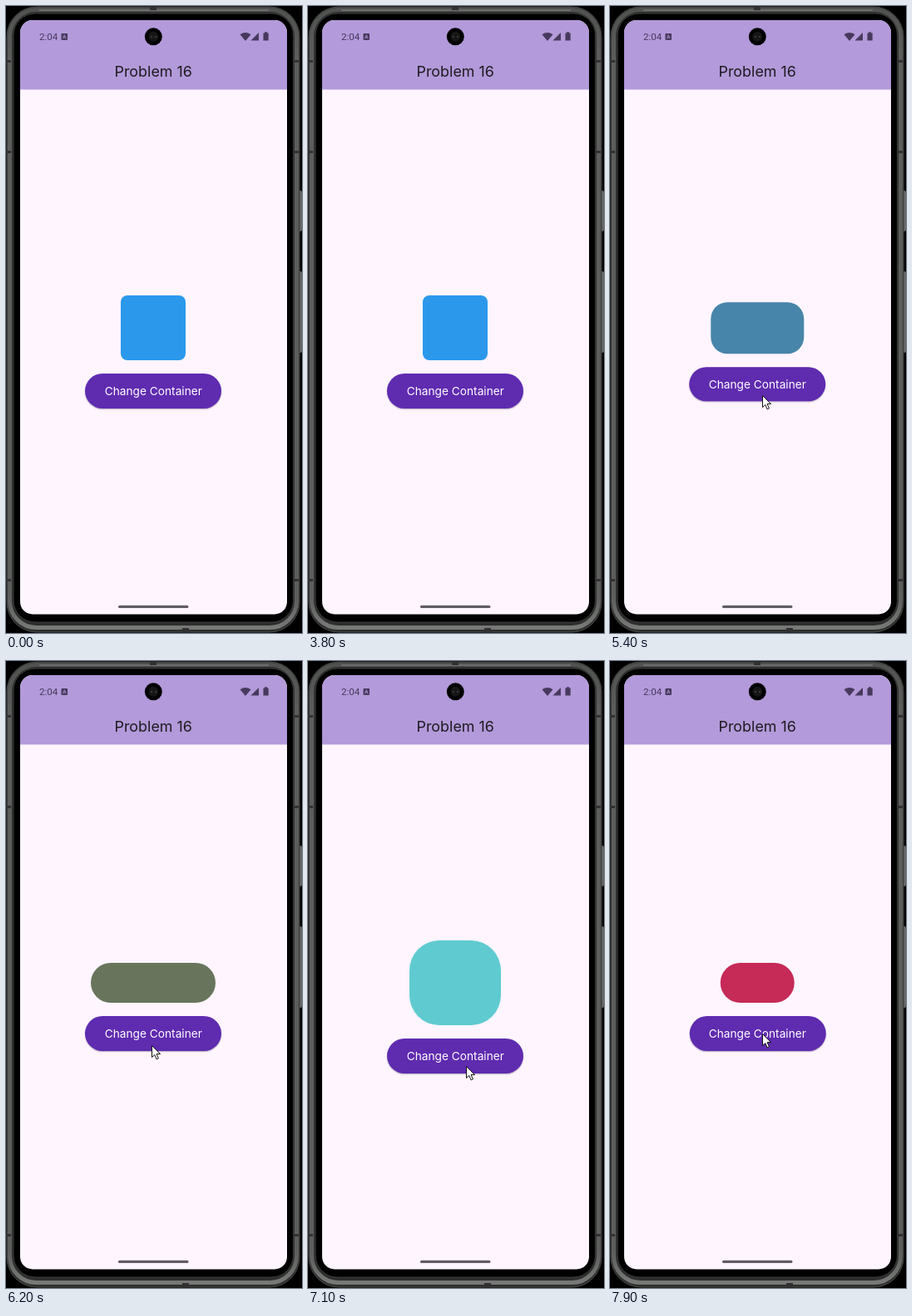
Recreate the animation shown at these times as an HTML page. Size 356x754 px, loop 8000 ms.

```html
<!DOCTYPE html>
<html lang="en">
<head>
<meta charset="utf-8">
<title>Change Container</title>
<style>
  html, body { margin: 0; width: 100%; height: 100%; overflow: hidden; background: #000; }
  .stage { position: relative; width: 356px; height: 754px; overflow: hidden; }
  .stage > svg { position: absolute; left: 0; top: 0; }

  /* The small negative delay keeps stepped poses clear of the 100 ms boundaries. */
  .box, .cursor { animation: 8s -10ms infinite; }

  .box {
    position: absolute; left: 177.3px; top: 387.4px;
    transform: translate(-50%, -50%);
    animation-name: morph; animation-timing-function: step-end;
  }
  .button {
    position: absolute; left: 50%; top: calc(100% + 16px);
    width: 164px; height: 41.5px; margin-left: -82px;
    border-radius: 21px; background: #5f2baf;
    box-shadow: 0 1px 1.5px rgba(40, 20, 60, .35);
    color: #fff; font: 13.7px/42px Inter, sans-serif;
    text-align: center; white-space: nowrap;
  }
  .cursor { animation-name: point; animation-timing-function: step-end; }

  @keyframes morph {
    0% { width: 78px; height: 78px; border-radius: 8px; background: #2b98ec; }
    63.75% {
      width: 78px; height: 78px; border-radius: 8px; background: #2b98ec;
      animation-timing-function: steps(3);
    }
    67.5% {
      width: 111.5px; height: 61.5px; border-radius: 20px; background: #4885aa;
      animation-timing-function: steps(3);
    }
    71.25% { width: 150px; height: 48px; border-radius: 33px; background: #68755c; }
    77.5% {
      width: 150px; height: 48px; border-radius: 33px; background: #68755c;
      animation-timing-function: steps(6);
    }
    85% { width: 110px; height: 102px; border-radius: 36px; background: #5fcbd0; }
    88.75% {
      width: 110px; height: 102px; border-radius: 36px; background: #5fcbd0;
      animation-timing-function: steps(6);
    }
    96.25%, 100% { width: 88.5px; height: 48px; border-radius: 30px; background: #c62a57; }
  }

  @keyframes point {
    0% { opacity: 0; transform: translate(142px, 323px); }
    1.25% { opacity: 1; transform: translate(142px, 323px); }
    2.5% { transform: translate(214px, 372px); }
    3.75% { transform: translate(236px, 420px); }
    5% { transform: translate(200px, 446px); }
    8.75% { transform: translate(200px, 446px); animation-timing-function: steps(5); }
    15% { transform: translate(181px, 467px); }
    21.25% { transform: translate(179px, 468px); }
    26.25% { transform: translate(180px, 467px); }
    47.5% { opacity: 0; }
    60% { opacity: 1; transform: translate(292px, 424px); }
    61.25% { transform: translate(240px, 452px); }
    62.5% { transform: translate(200px, 465px); }
    63.75% { transform: translate(183px, 468px); }
    67.5% { transform: translate(183px, 468px); animation-timing-function: steps(4); }
    72.5% { transform: translate(175px, 462px); }
    77.5% { transform: translate(175px, 462px); animation-timing-function: steps(6); }
    85% { transform: translate(190px, 487px); }
    88.75% { transform: translate(190px, 487px); animation-timing-function: steps(8); }
    98.75%, 100% { opacity: 1; transform: translate(183px, 448px); }
  }
</style>
</head>
<body>
<div class="stage">
  <svg width="356" height="754" viewBox="0 0 356 754">
    <defs>
      <linearGradient id="metal" x2="0" y2="1">
        <stop offset="0" stop-color="#505250"/>
        <stop offset=".08" stop-color="#5c5e5c"/>
        <stop offset=".95" stop-color="#5c5e5c"/>
        <stop offset="1" stop-color="#777977"/>
      </linearGradient>
    </defs>

    <!-- side buttons -->
    <g fill="#666866">
      <rect x="350" y="222" width="6" height="49" rx="2"/>
      <rect x="350" y="319" width="6" height="98" rx="2"/>
    </g>

    <!-- body and bezel -->
    <rect x="1" y="1" width="352" height="752" rx="36" fill="#2c2d2c" stroke="#4a4c4a"/>
    <rect x="4.5" y="4.5" width="345" height="743" rx="32" fill="none" stroke="url(#metal)" stroke-width="5"/>
    <rect x="9" y="9" width="336.5" height="732" rx="26" fill="#000" stroke="#3a3b3a"/>
    <path d="M40 5H316" stroke="#858785" stroke-width="1.2"/>
    <g fill="#303130">
      <rect x="0" y="65" width="6" height="3"/>
      <rect x="0" y="174" width="6" height="3"/>
      <rect x="347" y="65" width="5" height="3"/>
      <rect x="347" y="174" width="5" height="3"/>
      <rect x="0" y="689" width="6" height="3"/>
      <rect x="347" y="689" width="5" height="3"/>
      <rect x="173" y="1" width="8" height="4"/>
      <rect x="212" y="748" width="8" height="5"/>
    </g>

    <!-- screen -->
    <rect x="17" y="17" width="321" height="714.5" rx="15" fill="#fef5ff"/>
    <path d="M17 100.5V32A15 15 0 0 1 32 17H323A15 15 0 0 1 338 32V100.5Z" fill="#b39ada"/>
    <circle cx="177.3" cy="36.8" r="10.5" fill="#000"/>
    <circle cx="177.3" cy="36.8" r="6" fill="#161616"/>
    <g fill="#454545"><circle cx="175" cy="37" r="1"/><circle cx="180" cy="37" r="1"/></g>

    <!-- status bar -->
    <g fill="#47395d">
      <text x="40" y="41" font-family="Roboto, sans-serif" font-size="11.6">2:04</text>
      <rect x="66.5" y="33" width="7.5" height="8" rx="1"/>
      <path d="M281.5 34.3Q288 29.5 294.5 34.3L288 42Z"/>
      <path d="M304 32V41.5H294.5Z"/>
      <path d="M311.2 32.5V31.2H314V32.5H315.7V41.5H309.5V32.5Z"/>
    </g>
    <path d="M68.5 39.2L70.3 34.8L72.1 39.2M69.2 37.8H71.4" fill="none" stroke="#b39ada" stroke-width=".8"/>

    <text x="177.2" y="85" text-anchor="middle" font-family="Inter, sans-serif" font-size="17.9" fill="#1d1b20">Problem 16</text>
    <rect x="135" y="720.8" width="84.5" height="3.2" rx="1.6" fill="#625c66"/>
  </svg>

  <div class="box"><div class="button">Change Container</div></div>

  <svg width="356" height="754" viewBox="0 0 356 754">
    <path class="cursor" d="M.5 .5V14.6L3.8 11.5L6.1 16.9L8.4 15.9L6.1 10.6H10.6Z" fill="#fff" stroke="#111"/>
  </svg>
</div>
</body>
</html>
```
